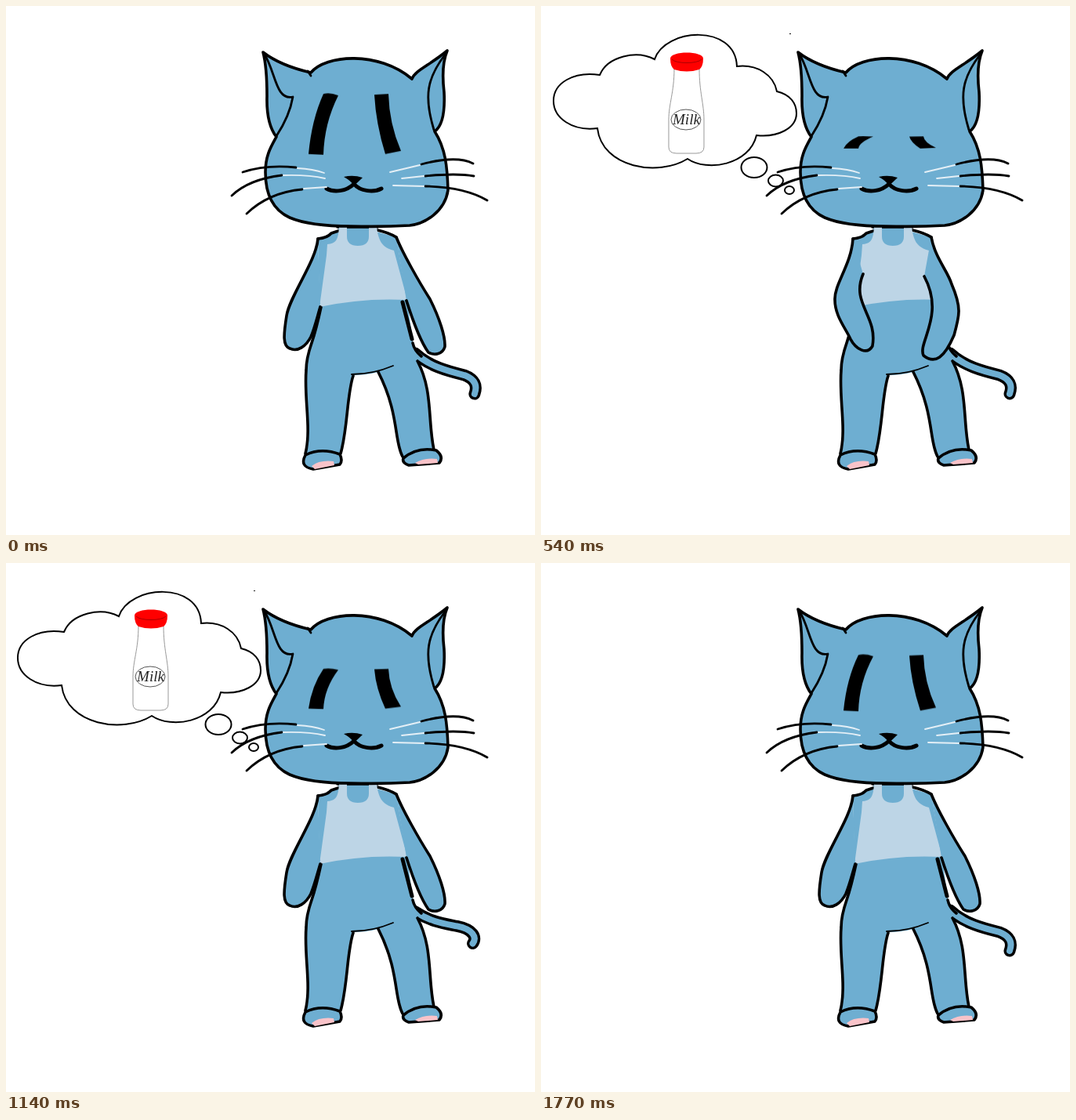
Animation of 675x675 px, one loop 1800 ms. Source, as an HTML page without scripts:

```html
<!DOCTYPE html>
<html lang="en">
<head>
<meta charset="utf-8">
<title>Cat dreaming of milk</title>
<style>
  html, body { margin: 0; width: 100%; height: 100%; overflow: hidden; background: #fff; }
  svg { display: block; width: 100vw; height: 100vh; }

  .skin { fill: #6eaed1; }
  .ink { stroke: #000; stroke-width: 3.6; stroke-linecap: round; stroke-linejoin: round; }
  .line { fill: none; }
  .pink { fill: #f9c3c9; }
  .shirt { fill: #bdd5e6; }
  .thin { stroke-width: 2.8; }
  .thick { stroke-width: 5; }
  .hair { stroke-width: 1.8; }
  .pale { stroke: #e4eff6; stroke-width: 1.8; stroke-linecap: round; }
  .bubble { fill: #fff; stroke: #000; stroke-width: 2; }
  .glass { fill: #fff; stroke: #999; stroke-width: 1; }
  .label { font: italic 19px "Liberation Serif", "Noto Serif", serif; text-anchor: middle; fill: #222; }

  .cloud, .eyes, .arm, .tail { animation: 1800ms linear infinite; }
  .cloud { animation-name: think; transform-origin: 170px 183px; }
  .eyes { animation-name: blink; transform-origin: 0 180px; }
  .arm.left { animation-name: left-arm; }
  .arm.right { animation-name: right-arm; }
  .tail { animation-name: wag; fill: none; stroke-linecap: round; stroke-linejoin: round; }
  .tail.edge { stroke: #000; stroke-width: 15; }
  .tail.fur { stroke: #6eaed1; stroke-width: 8; }

  @keyframes think {
    0% { transform: translate(222px) scale(0); }
    15% { transform: translate(97px) scale(.756); }
    25%, 30% { transform: none; }
    31.67%, 67.5% { transform: translate(-1px); }
    71.67% { transform: translate(18px) scale(.865); }
    85% { transform: translate(136px) scale(.365); }
    94.7%, 100% { transform: translate(222px) scale(0); }
  }

  @keyframes blink {
    0%, 100% { transform: none; }
    15% { transform: scaleY(.49); }
    30% { transform: scaleY(.2); }
    53.33% { transform: scaleY(.53); }
    71.67% { transform: scaleY(.77); }
    85% { transform: scaleY(.91); }
    98.33% { transform: scaleY(.92); }
  }

  @keyframes left-arm {
    0%, 61%, 100% { d: path("M398,297 C396,325 362,370 358,395 C354,420 353,434 362,437 C372,442 383,434 389,422 C394,410 397,397 401,384"); }
    15% { d: path("M398,297 C394,330 378,352 370,376 C364,395 372,415 376,430 C381,443 397,446 403,437 C412,420 411,390 406,345"); }
    30% { d: path("M398,297 C396,330 374,355 375,375 C375,395 388,410 395,425 C402,438 416,446 423,434 C430,395 395,380 411,342"); }
    53.33% { d: path("M398,297 C396,330 371,362 367,383 C362,405 362,425 368,436 C376,446 385,440 389,430 C400,412 405,385 405,345"); }
  }

  @keyframes right-arm {
    0%, 61%, 100% { d: path("M498,295 C506,315 527,352 541,374 C553,398 561,422 560,435 C557,445 546,446 539,442 C529,428 518,398 511,376"); }
    15% { d: path("M498,295 C505,318 526,352 536,374 C545,400 542,420 538,440 C532,454 520,455 514,447 C508,430 508,390 489,335"); }
    30% { d: path("M498,295 C503,322 519,338 524,355 C537,385 534,395 527,420 C515,448 503,458 488,446 C480,430 516,395 489,345"); }
    53.33% { d: path("M498,295 C505,318 527,354 538,378 C547,400 550,425 549,437 C544,449 530,449 524,441 C512,415 508,390 490,340"); }
  }

  @keyframes wag {
    0%, 30%, 98.33%, 100% { d: path("M522,443 C540,460 565,466 585,471 C598,476 602,484 598,495"); }
    15% { d: path("M525,449 C543,455 558,473 568,490 C574,503 574,517 563,517"); }
    53.33% { d: path("M522,447 C545,462 565,458 585,453 C605,446 613,448 612,457"); }
    71.67% { d: path("M522,443 C540,455 555,462 568,472 C588,485 592,502 582,509"); }
    85% { d: path("M522,443 C540,455 552,465 564,478 C579,495 580,514 566,516"); }
  }
</style>
</head>
<body>
<svg viewBox="0 0 675 675">
  <g class="cloud">
    <path class="bubble" d="M72,156 C40,160 16,143 16,121 C16,98 42,83 75,88 C85,64 122,56 145,68 C158,28 248,22 250,77 C276,74 297,88 301,109 C318,113 326,124 326,137 C326,156 302,168 275,165 C266,203 212,212 187,195 C150,218 78,207 72,156Z"/>
    <ellipse class="bubble" cx="272" cy="206" rx="16.5" ry="13"/>
    <ellipse class="bubble" cx="299.5" cy="223" rx="9.5" ry="7.5"/>
    <ellipse class="bubble" cx="317" cy="235" rx="6" ry="5"/>
    <rect x="317" y="35" width="2" height="1"/>
    <path class="glass" d="M170,80 C170,110 163,125 163,145 V180 Q163,188 173,188 H198 Q208,188 208,180 V145 C208,125 202,110 202,80Z"/>
    <path fill="#f00" d="M165,67 C165,57 207,57 207,67 Q207,77 202,81 Q186,86 170,81 Q165,77 165,67Z"/>
    <path class="line" stroke="#a00" d="M167,68 C172,74 200,74 205,68"/>
    <ellipse class="glass" cx="185" cy="145" rx="19" ry="13" style="stroke:#555"/>
    <text class="label" x="185.5" y="151">Milk</text>
  </g>

  <path class="tail edge"/>
  <path class="tail fur"/>

  <!-- body and legs -->
  <path class="skin" d="M398,297 L424,288 V278 H473 V288 L498,295 L512,376 L519,428 Q521,440 530,448 L526,453 C545,490 538,530 546,570 L506,576 C495,555 502,520 475,467 Q460,471 443,471 C435,495 436,540 427,572 L381,572 C390,540 380,500 383,465 Q383,450 390,430 L400,384Z"/>
  <g class="ink line">
    <path d="M398,297 Q410,296 415,290 L424,287 M423,282 H474 M474,286 Q488,289 498,295"/>
    <path d="M402,384 Q396,412 390,430 Q383,450 383,465 C380,500 390,540 382,571"/>
    <path d="M443,472 C435,495 436,540 427,571 M475,467 C502,520 495,555 506,575"/>
    <path d="M519,430 Q521,440 530,447 M525,453 C545,490 538,530 546,566"/>
    <path class="hair" d="M441,470 Q468,470 494,459"/>
    <path class="thick" d="M506,378 L518,425"/>
  </g>

  <!-- feet -->
  <path class="skin ink" d="M382,573 Q402,563 426,572 Q430,580 426,585 L392,591 Q374,588 382,573Z"/>
  <path class="skin ink" d="M507,577 Q525,562 549,567 Q559,575 553,583 L514,586 Q505,583 507,577Z"/>
  <path class="pink" d="M390,587 Q400,579 418,581 L419,586 L394,591Z"/>
  <path class="pink" d="M522,583 Q534,576 550,578 L551,583 L526,585Z"/>

  <path class="shirt" d="M425,281 C424,299 421,303 410,304 L409,318 L400,384 Q455,372 512,375 L495,312 C480,308 475,300 473,281 H463 V294 Q463,306 449,306 Q435,306 435,294 V281Z"/>
  <path class="arm left skin ink"/>
  <path class="arm right skin ink"/>

  <!-- head -->
  <path class="skin ink" d="M328,59 Q350,76 389,85 C408,62 475,57 518,93 C522,82 540,76 563,57 Q555,76 559,110 Q561,150 547,160 C561,182 563,205 564,235 C560,262 535,278 515,280 Q480,282 440,281 C410,281 383,279 362,270 C340,260 331,240 331,212 C331,190 339,178 345,167 Q332,150 333,115 Q333,78 328,59Z"/>
  <g class="ink line">
    <path class="thin" d="M330,62 C344,84 344,121 366,116 Q362,140 345,166 M385,83 L389,89"/>
    <path class="thin" d="M561,61 C537,92 533,115 546,158"/>
    <path class="thin" d="M302,212 Q332,202 370,206 M288,242 Q310,221 352,216 M307,265 Q335,238 378,234"/>
    <path class="thin" d="M596,201 Q575,190 530,202 M597,217 Q575,213 535,217 M614,248 Q585,231 535,230"/>
    <path class="thick" d="M409,233 C418,238 434,237 444,227 C452,237 470,238 479,233"/>
  </g>
  <path class="pale line" d="M372,207 Q392,208 406,213 M354,216 Q385,215 407,220 M380,233 L409,231 M528,203 L490,212 M533,217 L505,220 M533,230 L494,229"/>
  <path d="M431,218 Q443,215 455,219 Q449,225 444,229 Q440,223 431,218Z"/>
  <g class="eyes">
    <path d="M405,112 Q414,110 424,114 Q406,150 405,190 L386,189 Q390,145 405,112Z"/>
    <path d="M470,113 L488,112 Q489,150 504,185 L484,189 Q472,150 470,113Z"/>
  </g>
</svg>
</body>
</html>
```
